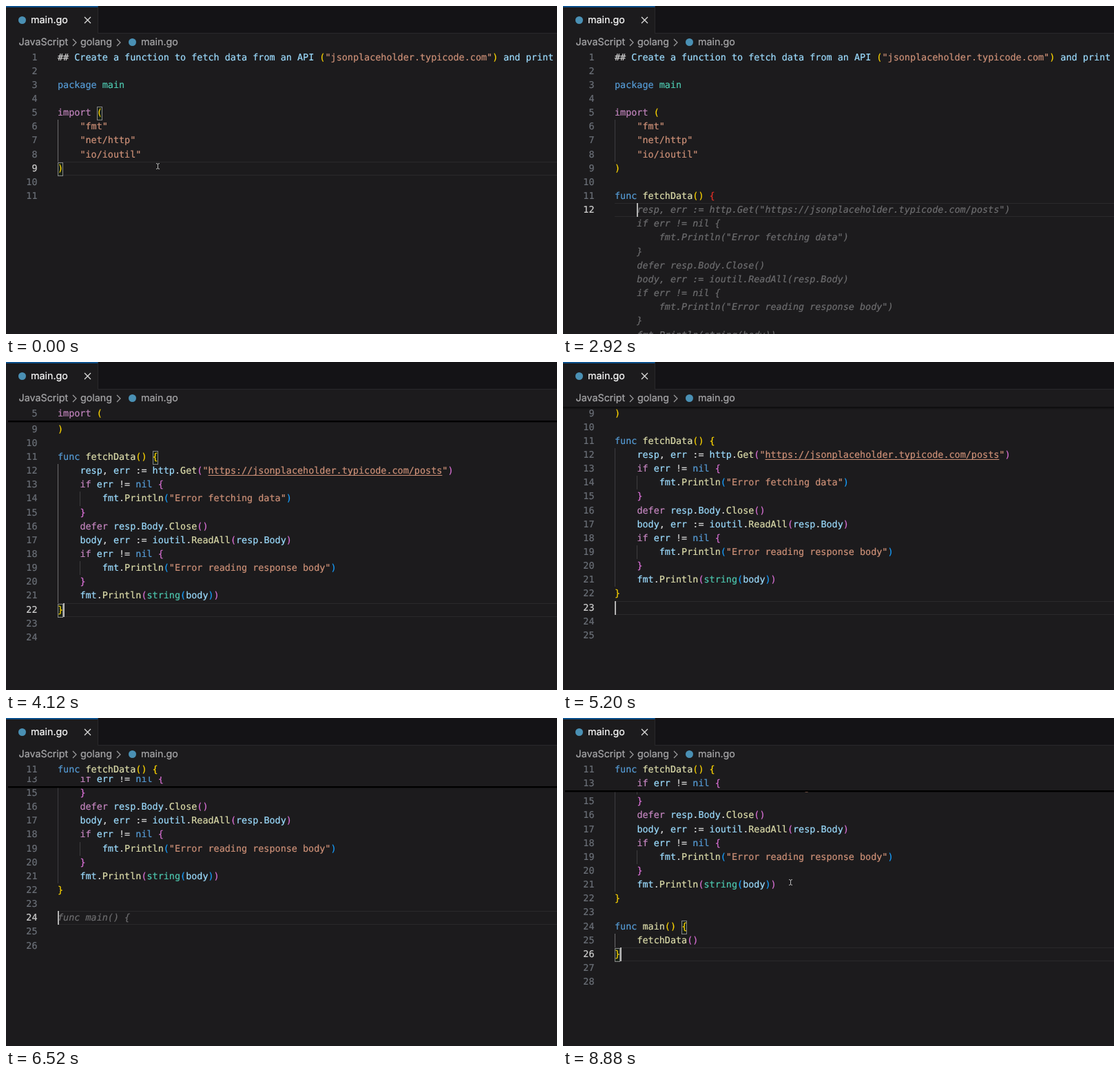
Write an HTML page that moves like this. It is 800 px wide and 476 px high and loops after 8.92 s.

```html
<!DOCTYPE html>
<html lang="en">
<head>
<meta charset="utf-8">
<title>Editor</title>
<style>
html, body { margin: 0; width: 100%; height: 100%; overflow: hidden; background: #1c1b1d; }
#stage { position: absolute; left: 0; top: 0; width: 800px; height: 476px; overflow: hidden;
  background: #1c1b1d; text-rendering: geometricPrecision; -webkit-text-stroke: .2px; }
#stage div, #stage svg { position: absolute; }
#tabs { left: 0; top: 0; width: 800px; height: 39px; background: #141316; border-bottom: 1px solid #29282b; }
#tab { left: 0; top: 0; width: 133px; height: 38px; background: #1c1b1d;
  border-top: 2px solid #0c4f8a; border-right: 1px solid #29282b; }
.ui { font: 14.3px/20px Inter, sans-serif; color: #a9a9ab; white-space: pre; }
.dot { width: 11px; height: 11px; border-radius: 50%; background: #4a90b4; }
#editor { left: 0; top: 64.5px; width: 800px; height: 411.5px; overflow: hidden;
  font: 13.45px/20.15px "DejaVu Sans Mono", monospace; white-space: pre; }
.row { left: 0; width: 800px; height: 20.15px; }
.num { left: 0; top: 1px; width: 45.5px; text-align: right; color: #6b7078; }
.now { color: #d0d0d0; }
.code { left: 75px; top: 1px; color: #d4d4d4; }
.line { left: 75px; width: 730px; height: 18.15px; border: solid #2a292b; border-width: 1px 0; }
.guide { top: 0; width: 1px; height: 20.2px; background: #3e3d40; }
.lit { background: #6c6c6e; }
.caret { top: 0; width: 2px; height: 20.15px; background: #b4b4b4; }
.match { display: inline-block; height: 20.15px; vertical-align: top;
  background: rgba(0, 100, 0, .1); box-shadow: inset 0 0 0 1px #868686; }
.ghost { color: #6d6d6f; font-style: italic; }
.link { text-decoration: underline 1px; text-underline-offset: 2px; text-decoration-skip-ink: none; }
.pin { background: #1c1b1d; }
.shade { left: 0; width: 800px; height: 4px; background: linear-gradient(rgba(0,0,0,.6), transparent); }
.deep { left: 3px; height: 3px; background: linear-gradient(#000 60%, transparent); }
</style>
</head>
<body>
<div id="stage">
  <div id="tabs">
    <div id="tab"></div>
    <div class="dot" style="left:18px;top:15px"></div>
    <div class="ui" style="left:36px;top:11px;color:#fff">main.go</div>
    <svg style="left:113px;top:15px" width="11" height="11" stroke="#dedede" stroke-width="1.3"><path d="M1 1L10 10M10 1L1 10"/></svg>
  </div>
  <div class="ui" style="left:18.5px;top:43px">JavaScript</div>
  <svg style="left:95px;top:47px" width="8" height="12" fill="none" stroke="#a0a0a2" stroke-width="1.2"><path d="M2 1L7 6L2 11"/></svg>
  <div class="ui" style="left:108px;top:43px">golang</div>
  <svg style="left:159px;top:47px" width="8" height="12" fill="none" stroke="#a0a0a2" stroke-width="1.2"><path d="M2 1L7 6L2 11"/></svg>
  <div class="dot" style="left:178px;top:47px"></div>
  <div class="ui" style="left:196px;top:43px">main.go</div>
  <div id="editor"></div>
  <svg id="mouse" width="7" height="11" fill="none" stroke="#b8b8b8"><path d="M1 1.5Q3.5 1.5 3.5 3V8Q3.5 9.5 1 9.5M6 1.5Q3.5 1.5 3.5 3M3.5 8Q3.5 9.5 6 9.5"/></svg>
</div>
<script>
const LOOP = 8920, ROW = 20.15, CH = 8.098, LEFT = 75;

const START = `## Create a function to fetch data from an API ("jsonplaceholder.typicode.com") and print

package main

import (
    "fmt"
    "net/http"
    "io/ioutil"
)`;

const FETCH = `fetchData() {
    resp, err := http.Get("https://jsonplaceholder.typicode.com/posts")
    if err != nil {
        fmt.Println("Error fetching data")
    }
    defer resp.Body.Close()
    body, err := ioutil.ReadAll(resp.Body)
    if err != nil {
        fmt.Println("Error reading response body")
    }
    fmt.Println(string(body))
}`;

// [time, action, text, ms per character]
const EDITS = [
  [400, 'put', '\n'], [640, 'put', '\n'],
  [960, 'type', 'func ', 110], [1640, 'hint', FETCH],
  [1920, 'type', 'fetchData() {', 45], [2600, 'put', '\n    '], [2960, 'accept'],
  [4760, 'put', '\n'], [5360, 'put', '\n'],
  [6360, 'hint', 'func main() {'], [6800, 'accept'], [7040, 'put', '\n    '],
  [7320, 'hint', 'fetchData()\n}'], [7840, 'accept'],
];

// [time, offset, eased]
const SCROLL = [
  [0, 0], [2959, 0], [2960, 3 * ROW], [3520, 3 * ROW], [3680, 80], [4120, 138],
  [4480, 8 * ROW], [5600, 8 * ROW], [6240, 247.7, 1], [8440, 247.7], [8760, 235.4, 1],
];

const COLORS = {
  package: '#569cd6', func: '#569cd6', nil: '#569cd6',
  import: '#c586c0', if: '#c586c0', defer: '#c586c0', string: '#4ec9b0',
};
const BRACKETS = ['#ffd700', '#da70d6', '#179fff'];

function scrollAt(t) {
  const i = SCROLL.findIndex(k => k[0] > t);
  if (i < 0) return SCROLL[SCROLL.length - 1][1];
  const [a, from] = SCROLL[i - 1], [b, to, eased] = SCROLL[i];
  const p = (t - a) / (b - a);
  return from + (to - from) * (eased ? p * p * (3 - 2 * p) : p);
}

function documentAt(t) {
  let before = START, hint = '', last = -740;
  const put = (s, at) => {
    before += s;
    hint = hint.startsWith(s) ? hint.slice(s.length) : '';
    last = at;
  };
  for (const [at, action, text, step] of EDITS) {
    if (at > t) break;
    if (action === 'put') put(text, at);
    if (action === 'accept') put(hint, at);
    if (action === 'hint') hint = text;
    if (action === 'type')
      [...text].forEach((c, i) => { if (at + i * step <= t) put(c, at + i * step); });
  }
  const lines = before.split('\n');
  const row = lines.length - 1;
  return { lines: [...lines, '', ''], row, col: lines[row].length, hint,
    caret: Math.floor((t - last) / 500) % 2 === 0 };
}

function findBrackets(lines) {
  const found = {}, stack = [], blocks = [];
  lines.forEach((line, row) => [...line].forEach((c, col) => {
    const id = row + ':' + col;
    if ('({'.includes(c)) {
      found[id] = { color: 'rgba(255,50,40,.85)' };
      stack.push({ id, row });
    } else if (')}'.includes(c) && stack.length) {
      const open = stack.pop(), depth = stack.length;
      const color = BRACKETS[depth % 3];
      found[open.id] = { color, mate: id };
      found[id] = { color, mate: open.id };
      if (open.row < row) blocks.push({ start: open.row, end: row, depth });
    }
  }));
  return { found, blocks };
}

const span = (color, text, cls = '') => `<span class="${cls}" style="color:${color}">${text}</span>`;
const box = (cls, style, text = '') => `<div class="${cls}" style="${style}">${text}</div>`;

function paint(line, row, found, marked, linked) {
  let prev = '';
  return line.replace(/"[^"]*"|\w+|[(){}]/g, (word, col) => {
    const id = row + ':' + col, bracket = found[id];
    if (bracket) return span(bracket.color, word, marked.includes(id) ? 'match' : '');
    if (word[0] === '"') {
      const body = word.slice(1, -1);
      const url = linked && body.startsWith('https');
      return span('#ce9178', url ? `"<span class="link">${body}</span>"` : word);
    }
    const isCall = line[col + word.length] === '(';
    const color = COLORS[word] || (prev === 'package' ? '#4ec9b0' : isCall ? '#dcdcaa' : '#9cdcfe');
    prev = word;
    return span(color, word);
  });
}

function render(t) {
  const doc = documentAt(t), { lines, row, col, hint } = doc;
  const scroll = scrollAt(t);
  const { found, blocks } = findBrackets(lines);
  const at = row + ':' + (col - 1);
  const marked = found[at] && found[at].mate ? [at, found[at].mate] : [];
  const active = marked.length && blocks.find(b => b.end === row);
  const ghost = hint.split('\n');
  const top = i => i * ROW - scroll + (i > row ? (ghost.length - 1) * ROW : 0);
  const code = i => box('num' + (i === row ? ' now' : ''), '', i + 1) +
    box('code', '', paint(lines[i], i, found, marked, t >= 3720));

  let html = box('line', `top:${top(row)}px`);
  lines.forEach((line, i) => {
    let inner = '';
    const indent = line.trim() ? line.search(/\S/) : 0;
    for (let g = 0; g < indent; g += 4) {
      const lit = active && g === 0 && i > active.start && i < active.end;
      inner += box('guide' + (lit ? ' lit' : ''), `left:${LEFT + g * CH}px`);
    }
    inner += code(i);
    if (i === row) {
      const x = `left:${LEFT + col * CH}px`;
      inner += box('code ghost', x, ghost[0]);
      if (doc.caret) inner += box('caret', x);
    }
    html += box('row', `top:${top(i)}px`, inner);
  });
  ghost.slice(1).forEach((text, i) => {
    html += box('row', `top:${top(row) + (i + 1) * ROW}px`, box('code ghost', '', text));
  });

  // Headers of open blocks stay pinned until their last line pushes them out.
  let edge = 0, pins = '';
  blocks.sort((a, b) => b.depth - a.depth).forEach(b => {
    const slot = b.depth * ROW;
    if (top(b.start) >= slot - .1 || top(b.end) <= slot + .1) return;
    const y = Math.min(slot, top(b.end) - ROW);
    edge = Math.max(edge, y + ROW);
    pins += box('row pin', `top:${y}px`, code(b.start));
  });
  if (scroll > 0) html += box('shade' + (edge ? ' deep' : ''), `top:${edge}px`);
  return html + pins;
}

const editor = document.getElementById('editor');
const mouse = document.getElementById('mouse');
const began = performance.now();
let shown = '';

function frame() {
  const t = (performance.now() - began) % LOOP;
  const html = render(t);
  if (html !== shown) editor.innerHTML = shown = html;
  const late = t >= 8480;
  mouse.style.display = t < 400 || late ? 'block' : 'none';
  mouse.style.left = (late ? 326.5 : 216.5) + 'px';
  mouse.style.top = (late ? 232.5 : 227) + 'px';
  requestAnimationFrame(frame);
}
frame();
</script>
</body>
</html>
```
